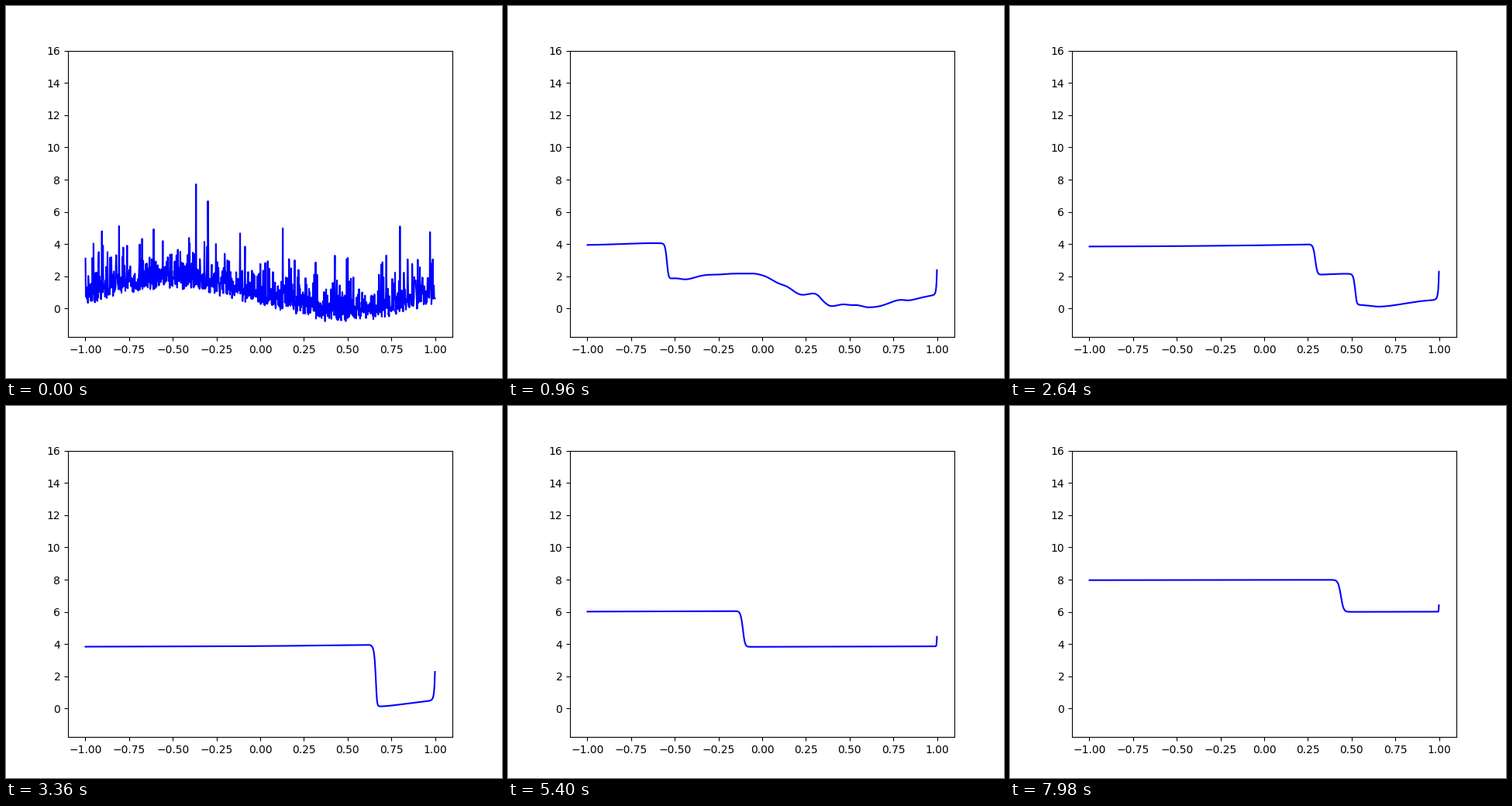
A matplotlib script for the animation above (8000 ms loop, 640 px wide and 480 px high).

```python
import numpy as np
import matplotlib.pyplot as plt
from matplotlib.animation import FuncAnimation

# Viscous Burgers flow u_t + (u^2 / 2)_x = NU u_xx on a ring of cells.
# Whatever leaves on the right comes back on the left, raised by LIFT.
N = 1000
NU = 0.01 / np.pi
LIFT = 1.56
DX = 2 / N
DT = 0.01        # flow time per curve
SUB = 100        # solver steps per curve
CURVES = 134
TICK = 20        # ms per animation frame
HOLD = 3         # frames per curve

x = -1 + (np.arange(N) + 0.5) * DX


def start():
    rng = np.random.RandomState(7)
    return rng.lognormal(0, 0.67, N) - np.sin(np.pi * x)


def advance(u):
    u = u.copy()
    for _ in range(SUB):
        ring = np.append(u, u[0])
        # Upwind flux for either sign of u, minus diffusion.
        flux = (0.5 * np.maximum(ring[:-1], 0) ** 2
                + 0.5 * np.minimum(ring[1:], 0) ** 2
                - NU * np.diff(ring) / DX)
        u[1:] -= DT / SUB / DX * np.diff(flux)
        u[0] = u[-1] + LIFT
    return u


curves = [start()]
while len(curves) < CURVES:
    curves.append(advance(curves[-1]))

fig, ax = plt.subplots(figsize=(6.4, 4.8), dpi=100)
line, = ax.plot(x, curves[0], color="b", lw=1.5)
ax.set_xlim(1.1 * x[0], 1.1 * x[-1])
ax.set_ylim(-1.765, 16)


def draw(i):
    line.set_ydata(curves[i // HOLD])
    return line,


anim = FuncAnimation(fig, draw, frames=8000 // TICK, interval=TICK,
                     repeat=True, repeat_delay=0, blit=False)
plt.show()
```
